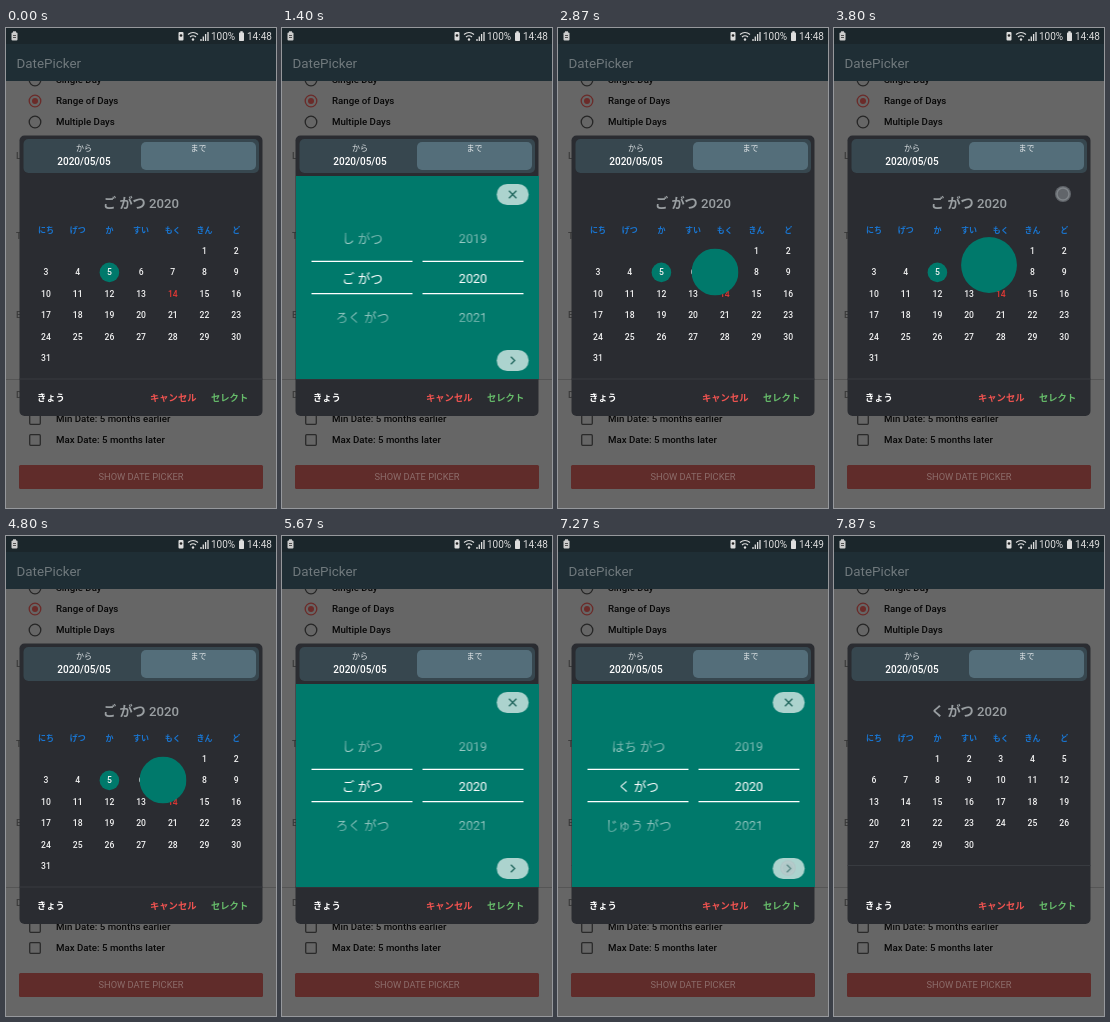
Animation of 270x480 px, one loop 8000 ms. Source, as an HTML page:

```html
<!DOCTYPE html>
<html lang="ja">
<head>
<meta charset="utf-8">
<title>DatePicker</title>
<style>
html, body { margin: 0; width: 100%; height: 100%; overflow: hidden; background: #666; }
#stage { position: relative; width: 270px; height: 480px; overflow: hidden; }
svg { position: absolute; left: 0; top: 0; display: block; }
text { font-family: Roboto, "Noto Sans CJK JP", "Noto Sans CJK", sans-serif; }
#panel {
  position: absolute; left: 13.5px; top: 148px; width: 243px; height: 203px;
  background: #00796b; animation: reveal 8s infinite;
}
#content { animation: content 8s linear infinite; }
#reel { animation: reel 8s infinite; }
#touch { animation: touch 8s linear infinite; }
.early { animation: early 8s step-end infinite; }
.late { animation: late 8s step-end infinite; }

@keyframes reveal {
  0%, 10.875%, 35%, 59.125% {
    clip-path: circle(0px at 143.5px 96px);
    animation-timing-function: cubic-bezier(.37, 0, .63, 1);
  }
  14.625%, 38.75%, 62.875% { clip-path: circle(180px at 143.5px 96px); }
  21.25%, 45.25%, 92.75% {
    clip-path: circle(185px at 141.5px 89px);
    animation-timing-function: cubic-bezier(.37, 0, .63, 1);
  }
  24.29%, 48.29%, 95.79% { clip-path: circle(0px at 141.5px 89px); }
  100% { clip-path: circle(0px at 143.5px 96px); }
}
@keyframes content {
  0%, 14%, 22.5%, 38%, 46.5%, 62.2%, 94%, 100% { opacity: 0; }
  15.8%, 21.25%, 39.8%, 45.25%, 64%, 92.75% { opacity: 1; }
}
@keyframes reel {
  0%, 70.9% { transform: translateY(0); animation-timing-function: cubic-bezier(.3, .3, .3, 1); }
  80.8%, 99.9% { transform: translateY(-158px); }
  100% { transform: translateY(0); }
}
@keyframes touch {
  0%, 5.8% { opacity: 0; transform: translate(150px, 176px); }
  6.2%, 8.4% { opacity: 1; transform: translate(150px, 176px); }
  9.2% { opacity: 0; transform: translate(150px, 176px); }
  9.3%, 20% { opacity: 0; transform: translate(229px, 166px); }
  20.4%, 23% { opacity: 1; transform: translate(229px, 166px); }
  24% { opacity: 0; transform: translate(229px, 166px); }
  24.1%, 30.8% { opacity: 0; transform: translate(150px, 176px); }
  31.2%, 33.2% { opacity: 1; transform: translate(150px, 176px); }
  34% { opacity: 0; transform: translate(150px, 176px); }
  34.1%, 44.6% { opacity: 0; transform: translate(229px, 166px); }
  45%, 47.6% { opacity: 1; transform: translate(229px, 166px); }
  48.6% { opacity: 0; transform: translate(229px, 166px); }
  48.7%, 55.8% { opacity: 0; transform: translate(150px, 176px); }
  56.2%, 57.8% { opacity: 1; transform: translate(150px, 176px); }
  58.6% { opacity: 0; transform: translate(150px, 176px); }
  58.7%, 70.9% { opacity: 0; transform: translate(85px, 295px); }
  71.3% { opacity: 1; transform: translate(85px, 290px); }
  73.8% { opacity: 1; transform: translate(85px, 215px); }
  74.4% { opacity: 0; transform: translate(85px, 205px); }
  74.5%, 89.6% { opacity: 0; transform: translate(230px, 332px); }
  90%, 92.4% { opacity: 1; transform: translate(230px, 332px); }
  93.4%, 99.9% { opacity: 0; transform: translate(230px, 332px); }
  100% { opacity: 0; transform: translate(150px, 176px); }
}
@keyframes early { 0% { opacity: 1; } 87.5%, 100% { opacity: 0; } }
@keyframes late { 0% { opacity: 0; } 87.5%, 100% { opacity: 1; } }
</style>
</head>
<body>
<div id="stage">
  <svg id="base" width="270" height="480"></svg>
  <div id="panel"><svg id="picker" width="243" height="203" viewBox="13.5 148 243 203"></svg></div>
  <svg width="270" height="480">
    <g id="touch">
      <circle r="8" fill="#b5bcc0" fill-opacity=".4"/>
      <circle r="6" fill="none" stroke="#c8ced0" stroke-opacity=".3" stroke-width="1.5"/>
    </g>
  </svg>
</div>
<script>
const label = (x, y, size, str, fill = '#fff', more = '') =>
  `<text x="${x}" y="${y + size * 0.36}" font-size="${size}" fill="${fill}" ${more}>${str}</text>`;
const MID = 'text-anchor="middle"', MEDIUM = 'font-weight="500"', BOLD = 'font-weight="700"';
const rect = (x, y, w, h, fill, more = '') =>
  `<rect x="${x}" y="${y}" width="${w}" height="${h}" fill="${fill}" ${more}/>`;
const path = (d, stroke, width) =>
  `<path d="${d}" fill="none" stroke="${stroke}" stroke-width="${width}"/>`;

const statusBar = () => rect(0, 0, 270, 16, '#1b262b') +
  rect(5.5, 4.5, 6, 8, '#ccc', 'rx="1"') + rect(7, 3.3, 3, 2, '#ccc') + path('M7 7.5h3M7 9.5h3', '#333', 0.8) +
  rect(172.5, 4, 5, 8.5, '#ddd', 'rx="1"') + `<circle cx="175" cy="7.5" r="1.3" fill="#222"/>` +
  path('M182 6.5q5 -4 10 0M184 9q3 -2.5 6 0', '#ddd', 1.2) + `<circle cx="187" cy="11.5" r="1.2" fill="#ddd"/>` +
  path('M195 13v-2M197.3 13v-4.5M199.6 13v-7M202 13v-9', '#ddd', 1.3) +
  label(205, 8.5, 10, '100%', '#ddd') +
  rect(233, 4.5, 5, 8.5, '#ddd', 'rx=".7"') + rect(234.3, 3.2, 2.4, 2, '#ddd') +
  label(241, 8.5, 10, '14:48', '#ddd', 'class="early"') +
  label(241, 8.5, 10, '14:49', '#ddd', 'class="late"');

const radio = (y, name, on) => {
  const color = on ? '#6b2b29' : '#262626';
  return `<circle cx="29" cy="${y}" r="5.8" fill="none" stroke="${color}" stroke-width="1.3"/>` +
    (on ? `<circle cx="29" cy="${y}" r="3" fill="${color}"/>` : '') +
    label(50, y, 9.7, name, '#080808', MEDIUM);
};
const checkbox = (y, name) =>
  rect(23.7, y - 5.3, 10.6, 10.6, 'none', 'rx="1" stroke="#2a2a2a" stroke-width="1.3"') +
  label(50, y, 9.7, name, '#080808', MEDIUM);

const app = () => rect(0, 16, 270, 464, '#666') +
  radio(52, 'Single Day') + radio(73, 'Range of Days', true) + radio(94, 'Multiple Days') +
  rect(0, 16, 270, 37, '#1f2e35') + label(10.5, 35, 13.4, 'DatePicker', '#70797d') +
  [...'LTED'].map((c, i) => label(10, 128 + i * 79.4, 9.4, c, '#3a3a3a', MEDIUM)).join('') +
  rect(0, 351, 270, 1, '#555') +
  checkbox(391, 'Min Date: 5 months earlier') + checkbox(412, 'Max Date: 5 months later') +
  rect(13, 437, 244, 24, '#602c2a', 'rx="1.5"') +
  label(135, 449, 9.3, 'SHOW DATE PICKER', '#8c6d6b', MID);

const dialog = () => rect(13.5, 107.5, 243, 280.5, '#2a2c31', 'rx="5"') +
  rect(17.5, 111, 235.5, 34, '#37474f', 'rx="5"') +
  rect(135, 114, 115, 28, '#546e7a', 'rx="5"') +
  label(78, 120, 8, 'から', '#e4e8ea', MID) +
  label(78, 133, 10, '2020/05/05', '#fff', `${MID} ${MEDIUM}`) +
  label(192.5, 120, 8, 'まで', '#e4e8ea', MID) +
  label(31, 369.6, 9.3, 'きょう', '#fff', BOLD) +
  label(144, 369.6, 9.3, 'キャンセル', '#ef5350', BOLD) +
  label(205, 369.6, 9.3, 'セレクト', '#66bb6a', BOLD);

const dayX = i => 40 + (i % 7) * 31.7;
const dayY = i => 223 + Math.floor(i / 7) * 21.4;
const weekdays = () => ['にち', 'げつ', 'か', 'すい', 'もく', 'きん', 'ど']
  .map((d, i) => label(dayX(i), 202, 8, d, '#1976d2', `${MID} ${BOLD}`)).join('');

function month(cls, name, first, count, lineY, chosen, today) {
  let out = label(135, 175.5, 13.2, `<tspan ${BOLD}>${name} がつ</tspan> 2020`, '#9a9fa2', `${MID} ${MEDIUM}`);
  for (let day = 1; day <= count; day++) {
    const i = first + day - 1;
    if (day === chosen) out += `<circle cx="${dayX(i)}" cy="${dayY(i)}" r="9.8" fill="#00796b"/>`;
    out += label(dayX(i), dayY(i), 8.6, day, day === today ? '#e53935' : '#f2f2f2', `${MID} ${MEDIUM}`);
  }
  return `<g class="${cls}">${out}${rect(13.5, lineY, 243, 1, '#383b40')}</g>`;
}

const pill = (y, icon) => rect(214.2, y - 10.5, 32, 21, '#acd3ce', 'rx="10.5"') +
  `<g transform="translate(230.2 ${y})">${path(icon, '#1f655c', 1.3)}</g>`;
const STEP = 39.5;
const reelItems = (x, names, current) => names
  .map((n, i) => label(x, 250 + (i - current) * STEP, 12.6, n, '#fff', MID)).join('');

const picker = () => {
  const months = ['いち', 'に', 'さん', 'し', 'ご', 'ろく', 'しち', 'はち', 'く', 'じゅう', 'じゅういち', 'じゅうに']
    .map(n => `${n} がつ`);
  return `<defs>
    <linearGradient id="fade" gradientUnits="userSpaceOnUse" x1="0" y1="191" x2="0" y2="309">
      <stop offset="0" stop-color="#000"/><stop offset=".33" stop-color="#fff"/>
      <stop offset=".67" stop-color="#fff"/><stop offset="1" stop-color="#000"/>
    </linearGradient>
    <mask id="window" maskUnits="userSpaceOnUse" x="14" y="191" width="242" height="118">
      ${rect(14, 191, 242, 118, 'url(#fade)')}
    </mask></defs>
    <g id="content">
      <g mask="url(#window)">
        <g id="reel">${reelItems(80, months, 4)}</g>
        ${reelItems(190.5, [2019, 2020, 2021], 1)}
      </g>
      ${path('M29 233.3h101M140 233.3h101M29 265.7h101M140 265.7h101', '#fff', 1.3)}
      ${pill(166.5, 'M-3.7 -3.7l7.4 7.4M3.7 -3.7l-7.4 7.4')}
      ${pill(332.5, 'M-1.8 -3.8l3.8 3.8l-3.8 3.8')}
    </g>`;
};

document.getElementById('base').innerHTML = app() + statusBar() + dialog() + weekdays() +
  month('early', 'ご', 5, 31, 350.5, 5, 14) + month('late', 'く', 2, 30, 329);
document.getElementById('picker').innerHTML = picker();
</script>
</body>
</html>
```
